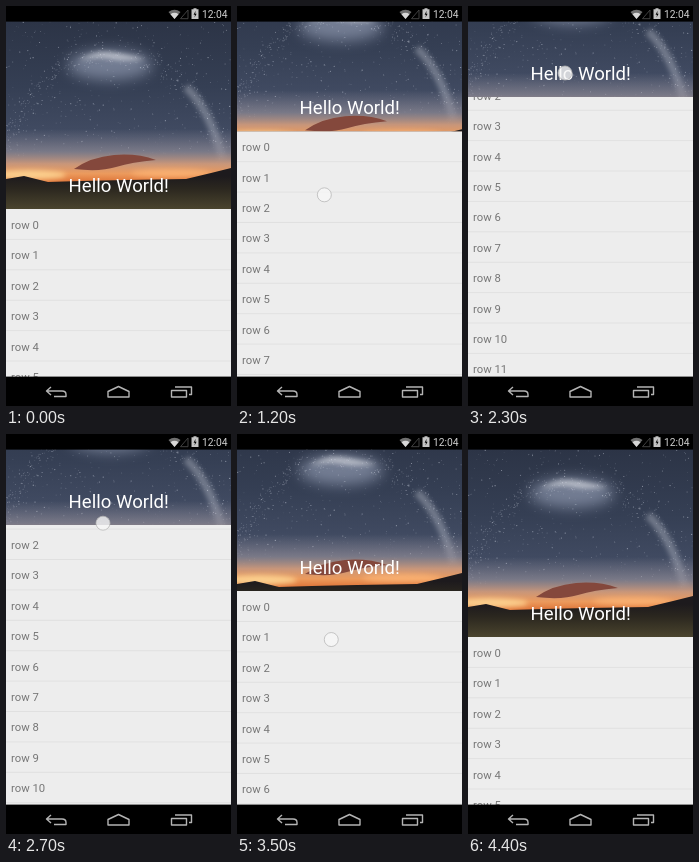
Write an HTML page that moves like this. It is 225x400 px and loops after 4500 ms.

```html
<!DOCTYPE html>
<html lang="en">
<head>
<meta charset="utf-8">
<title>Parallax list header</title>
<style>
  html, body { margin: 0; width: 100%; height: 100%; overflow: hidden; background: #000; }
  svg { display: block; overflow: hidden; }
  text { font-family: Roboto, "Open Sans", sans-serif; }
  #list text { font-size: 11.3px; fill: #767676; }
  #list path { stroke: #dedede; stroke-width: .8; }
  .icon { fill: none; stroke: #b4b4b4; stroke-width: 1.4; stroke-linejoin: round; }
</style>
</head>
<body>
<svg width="100%" height="100%" viewBox="0 0 225 400">
  <defs>
    <linearGradient id="sky" x2="0" y2="1">
      <stop offset="0" stop-color="#2c3446"/>
      <stop offset=".35" stop-color="#353f54"/>
      <stop offset=".7" stop-color="#465068"/>
    </linearGradient>
    <radialGradient id="dome" gradientUnits="userSpaceOnUse" r="1" gradientTransform="translate(108 150) scale(116 132)">
      <stop offset="0" stop-color="#5e6a88"/>
      <stop offset=".5" stop-color="#50608a"/>
      <stop offset=".78" stop-color="#66759a"/>
      <stop offset=".88" stop-color="#707c98" stop-opacity=".8"/>
      <stop offset="1" stop-color="#4a5468" stop-opacity="0"/>
    </radialGradient>
    <linearGradient id="dusk" x2="0" y2="1">
      <stop offset="0" stop-color="#8c8a98" stop-opacity="0"/>
      <stop offset=".4" stop-color="#8f8a94" stop-opacity=".7"/>
      <stop offset=".62" stop-color="#c8967a"/>
      <stop offset=".8" stop-color="#ec9a5c"/>
      <stop offset="1" stop-color="#d8662c"/>
    </linearGradient>
    <linearGradient id="land" x2="0" y2="1">
      <stop offset=".2" stop-color="#1d1a1d"/>
      <stop offset=".5" stop-color="#2b271f"/>
      <stop offset="1" stop-color="#4a442e"/>
    </linearGradient>
    <filter id="soft" x="-30%" y="-60%" width="160%" height="220%"><feGaussianBlur stdDeviation="7"/></filter>
    <filter id="haze" x="-30%" y="-60%" width="160%" height="220%"><feGaussianBlur stdDeviation="2.5"/></filter>
  </defs>

  <rect width="225" height="400" fill="#ededed"/>
  <g id="list"></g>

  <svg id="header" y="15" width="225" height="188">
    <g id="photo">
      <rect width="225" height="188" fill="url(#sky)"/>
      <rect width="225" height="188" fill="url(#dome)"/>
      <ellipse cx="104" cy="44" rx="42" ry="15" fill="#b4bed6" opacity=".5" filter="url(#soft)"/>
      <path d="M72 40Q88 29 104 31T140 38Q120 41 104 38T72 40Z" fill="#e2e4ea" opacity=".65" filter="url(#haze)"/>
      <path d="M180 66Q205 90 217 140" fill="none" stroke="#d0d4de" stroke-width="8" opacity=".38" filter="url(#haze)"/>
      <g id="stars" fill="#dfe4f0"></g>
      <rect y="108" width="225" height="56" fill="url(#dusk)"/>
      <ellipse cx="22" cy="154" rx="38" ry="5" fill="#ffdc9a" opacity=".8" filter="url(#haze)"/>
      <ellipse cx="165" cy="152" rx="40" ry="4" fill="#ffb878" opacity=".7" filter="url(#haze)"/>
      <path d="M68 148Q85 136 108 134T150 139Q126 141 110 146T68 148Z" fill="#84483c"/>
      <path d="M0 158L18 155L42 161L75 160L120 159L180 158L205 152L225 147V188H0Z" fill="url(#land)"/>
    </g>
    <text id="title" x="112.7" text-anchor="middle" font-size="18.6" fill="#fff">Hello World!</text>
  </svg>

  <circle id="touch" r="7" fill="#f6f6f6" fill-opacity=".8" stroke="#b4b4b4" stroke-opacity=".75"/>

  <rect width="225" height="15.6" fill="#000"/>
  <path d="M162.500 6Q168.500 1.500 174.500 6L168.500 13Z" fill="#707070"/>
  <path d="M164.500 8.200Q168.500 5.400 172.500 8.200L168.500 13Z" fill="#d8d8d8"/>
  <path d="M182 4V12.700H174.500Z" fill="none" stroke="#484848" stroke-width=".9"/>
  <path d="M187.500 3.300V2.300H190.500V3.300H192.500V13H185.500V3.300Z" fill="#c4c4c4"/>
  <path d="M189.600 4.800L187.600 8.800H189L188.500 11.500L190.600 7.800H189.200Z" fill="#000"/>
  <text x="196" y="12.200" font-size="10.3" fill="#d0d0d0">12:04</text>

  <rect y="370.6" width="225" height="30" fill="#000"/>
  <g class="icon">
    <path d="M45 381L40.500 385L45 389M41 385H56Q60 385 60 388.500V390.500H48"/>
    <path d="M102 391V385.500L112.500 380.500L123 385.500V391Z"/>
    <path d="M165.500 384.500H180.500V391H165.500ZM169 381H185.500V388.500H183"/>
  </g>
</svg>

<script>
const $ = id => document.getElementById(id);
const LOOP = 4500, STEP = 100, ROW = 30.4, FULL = 188, BAR = 76;

$('list').innerHTML = Array.from({ length: 16 }, (_, i) => {
  const top = 203 + i * ROW;
  return `<text x="5" y="${top + 20}">row ${i}</text><path d="M0 ${top + ROW}H225"/>`;
}).join('');

let seed = 7;
const random = () => (seed = seed * 16807 % 2147483647) / 2147483647;
const star = (x, y) =>
  `<circle cx="${x}" cy="${y}" r="${.25 + random() * .35}" opacity="${.15 + random() * .45}"/>`;

// Every other star gathers along the arch.
$('stars').innerHTML = Array.from({ length: 900 }, (_, i) => {
  if (i % 2) return star(random() * 225, random() * 135);
  const angle = Math.PI * random(), reach = .84 + (random() + random()) * .12;
  return star(108 + 112 * reach * Math.cos(angle), 150 - 122 * reach * Math.sin(angle));
}).join('');

// Smooth curve through [time, value] keys, without overshoot.
function track(...keys) {
  const rate = i => (keys[i + 1][1] - keys[i][1]) / (keys[i + 1][0] - keys[i][0]);
  const last = keys.length - 1;
  const slope = i => {
    if (i === 0 || i === last) return 0;
    const a = rate(i - 1), b = rate(i);
    return a * b > 0 ? 2 * a * b / (a + b) : 0;
  };
  return t => {
    if (t <= keys[0][0]) return keys[0][1];
    if (t >= keys[last][0]) return keys[last][1];
    const i = keys.findIndex(k => k[0] > t) - 1;
    const [t0, v0] = keys[i], [t1, v1] = keys[i + 1];
    const d = t1 - t0, u = (t - t0) / d, w = 1 - u;
    return v0 * (1 + 2 * u) * w * w + v1 * u * u * (3 - 2 * u)
      + d * u * w * (slope(i) * w - slope(i + 1) * u);
  };
}

const scrollAt = track([600, 0], [800, 21], [1600, 131.4], [2300, 190], [2400, 190], [3100, 112], [3800, 7], [3950, 0]);
const touchX = track([600, 86], [800, 86], [1600, 90], [2300, 97], [3100, 97], [3800, 91], [4000, 89]);
const touchY = track([200, 262], [600, 259], [800, 240], [1600, 137], [2300, 67], [2400, 67], [3100, 147], [3800, 246], [4000, 264]);

const shift = (id, x, y) => $(id).setAttribute('transform', `translate(${x} ${y})`);

function draw(now) {
  const t = Math.floor((now - start) % LOOP / STEP) * STEP;
  const scroll = scrollAt(t);
  const height = Math.max(BAR, FULL - scroll);
  shift('list', 0, -scroll);
  shift('photo', 0, (height - FULL) / 2);
  $('header').setAttribute('height', height);
  $('title').setAttribute('y', height - 17.5);
  shift('touch', touchX(t), touchY(t));
  $('touch').setAttribute('opacity', t < 200 || t >= 4400 ? 0 : t >= 4300 ? .5 : 1);
}

const start = performance.now();
function tick() {
  draw(performance.now());
  requestAnimationFrame(tick);
}
tick();
</script>
</body>
</html>
```
